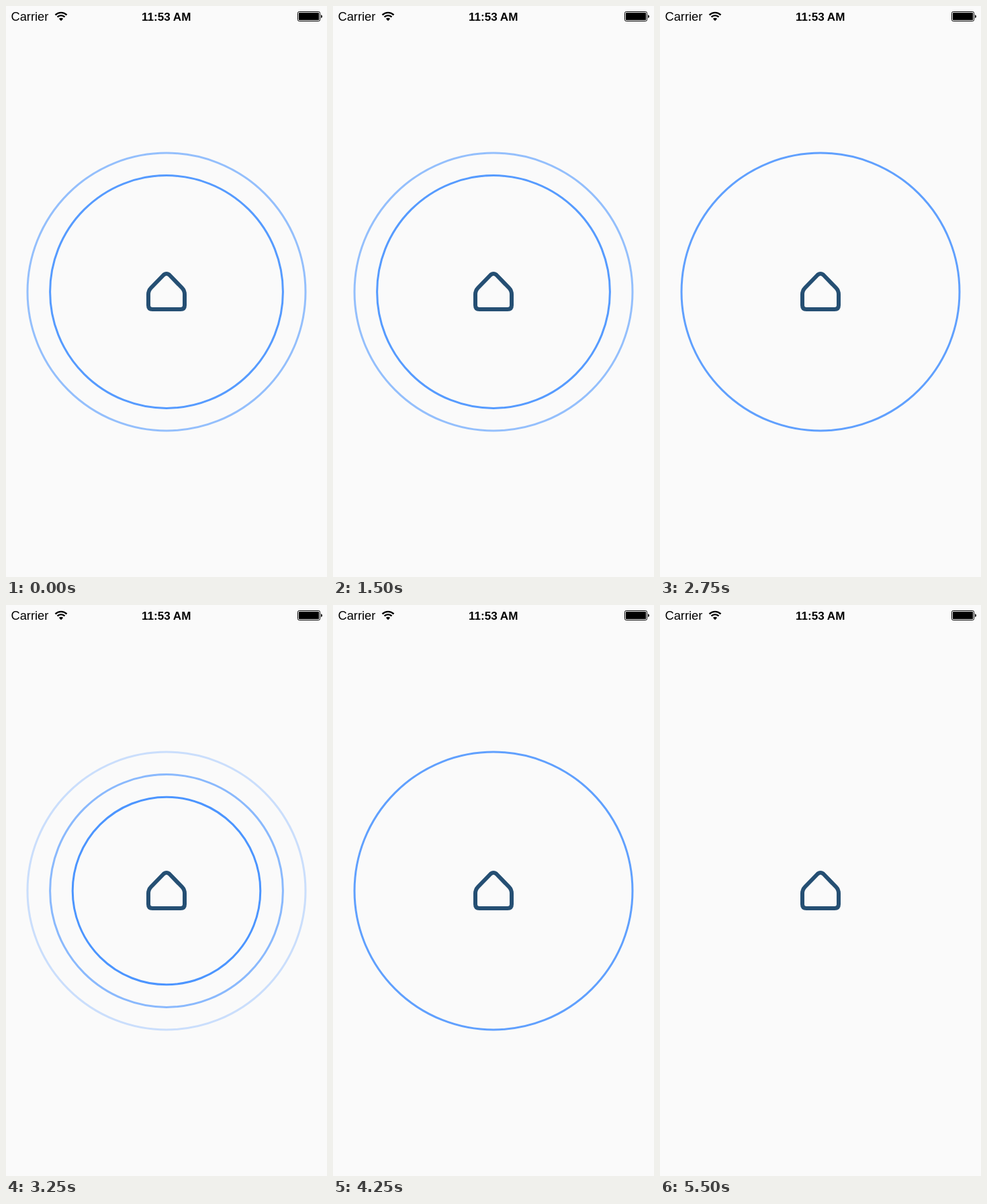
Recreate the animation shown at these times as an HTML page. Size 478 by 851 pixels, loop 5.75 s.

```html
<!DOCTYPE html>
<html lang="en">
<head>
<meta charset="utf-8">
<title>Home beacon</title>
<style>
  html, body { margin: 0; width: 100%; height: 100%; overflow: hidden; background: #fafafa; }
  svg { display: block; width: 478px; height: 851px; }
  text { font-family: "Liberation Sans", Arial, sans-serif; }
  #rings circle { fill: none; stroke: #4c95ff; stroke-width: 3; opacity: 0; }
</style>
</head>
<body>
<svg viewBox="0 0 478 851">
  <text x="7.5" y="22" font-size="18.3">Carrier</text>
  <g fill="none" stroke="#000" stroke-width="2.4">
    <path d="M73.5 13.3A12.2 12.2 0 0 1 90.5 13.3"/>
    <path d="M76.5 16.4A7.8 7.8 0 0 1 87.5 16.4"/>
  </g>
  <path d="M82 22.3L78.9 19A4.4 4.4 0 0 1 85.1 19Z"/>
  <text x="238.7" y="22" font-size="17.1" font-weight="700" text-anchor="middle">11:53 AM</text>
  <rect x="434.5" y="8.5" width="33" height="14" rx="2" fill="none" stroke="#000"/>
  <rect x="436" y="10" width="30" height="11" rx=".6"/>
  <path d="M469 13Q471 13.5 471 15.5T469 18Z"/>

  <g id="rings"></g>

  <path fill="none" stroke="#254f73" stroke-width="6" d="M212 446V430Q212 424 216 420L235 400.5
    Q239 397.5 243 400.5L262 420Q266 424 266 430V446Q266 452 260 452H218Q212 452 212 446Z"/>
</svg>
<script>
  const LOOP = 5750, TICK = 250;
  const CYCLE = 1500, START = 1150, STAGGER = 300, FADE = 830, COUNT = 4;

  const group = document.getElementById('rings');
  const rings = Array.from({ length: COUNT }, (_, i) => {
    const ring = document.createElementNS(group.namespaceURI, 'circle');
    ring.setAttribute('cx', 239);
    ring.setAttribute('cy', 426);
    ring.setAttribute('r', 207 - 33.6 * i);
    return group.appendChild(ring);
  });

  // Rings light up from the outside in, fade, then all clear for the last beat.
  function alpha(i, t) {
    const phase = (t + CYCLE - START) % CYCLE;
    const age = phase - i * STAGGER;
    if (age < 0 || phase >= COUNT * STAGGER) return 0;
    return Math.max(0, 1 - age / FADE);
  }

  function draw() {
    const t = Math.floor(performance.now() % LOOP / TICK) * TICK;
    rings.forEach((ring, i) => { ring.style.opacity = alpha(i, t); });
    requestAnimationFrame(draw);
  }
  draw();
</script>
</body>
</html>
```
